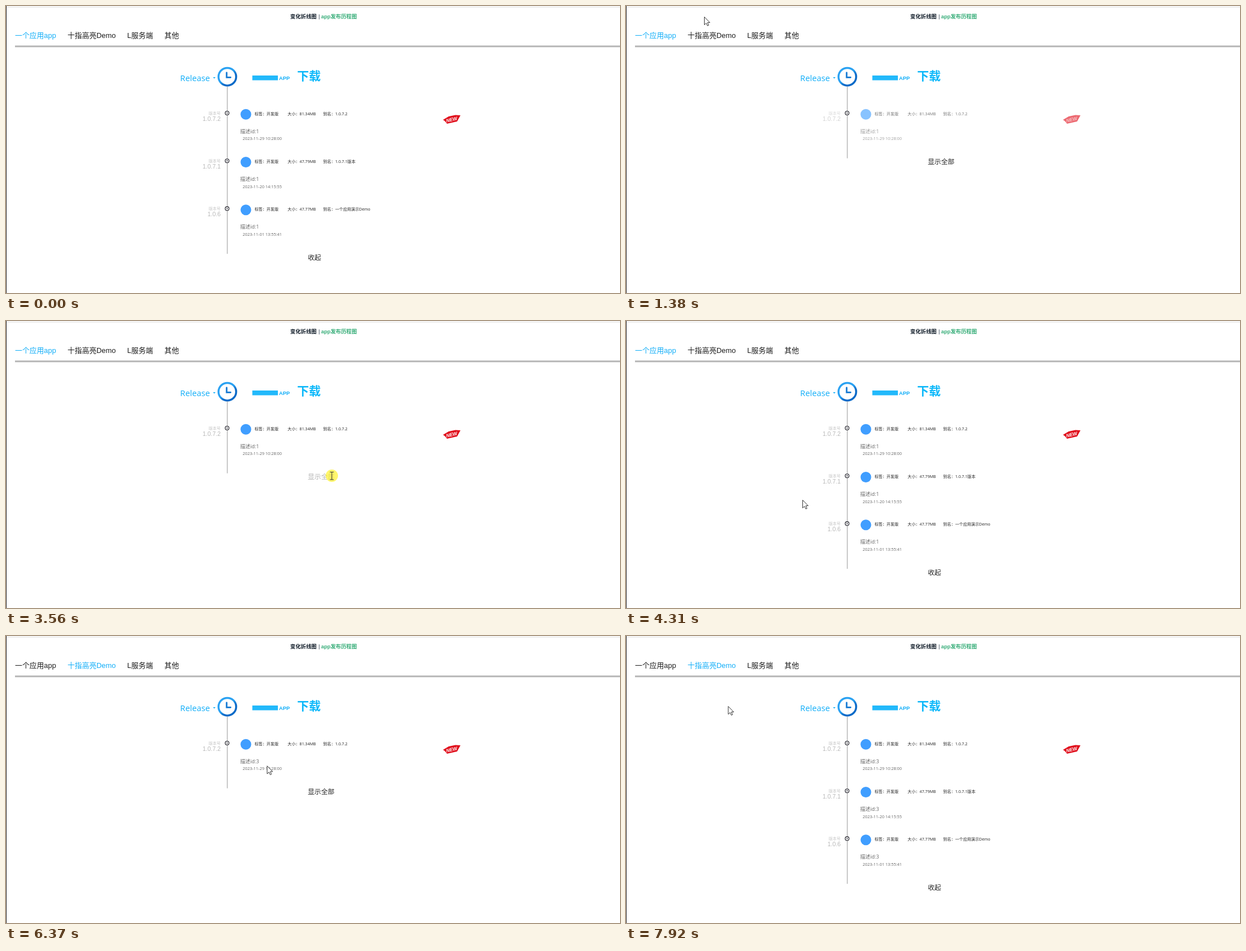
These frames come from a looping animation (1093x512 px, 7990 ms). An HTML page with a canvas:

```html
<!DOCTYPE html>
<html lang="zh-CN">
<head>
<meta charset="utf-8">
<style>
  html, body { margin: 0; width: 100%; height: 100%; overflow: hidden; background: #fff; }
  canvas { display: block; }
</style>
</head>
<body>
<canvas id="stage" width="1093" height="512"></canvas>
<script>
const ctx = document.getElementById('stage').getContext('2d');
const LOOP = 7990;
const STEP = 70;
const ROW = 85.2;
const CJK = '"Noto Sans CJK SC", "Noto Sans CJK", sans-serif';
const ARIAL = '"Liberation Sans", ' + CJK;
const UI = '"Open Sans", ' + CJK;
const BLUE = '#12aef8';

const tabs = ['一个应用app', '十指高亮Demo', 'L服务端', '其他'];
const releases = [
  { version: '1.0.7.2', size: '81.34MB', alias: '1.0.7.2', date: '2023-11-29 10:28:00' },
  { version: '1.0.7.1', size: '47.79MB', alias: '1.0.7.1版本', date: '2023-11-20 14:15:55' },
  { version: '1.0.6', size: '47.77MB', alias: '一个应用演示Demo', date: '2023-11-01 13:55:41' },
];

const RELOAD = 500, HEADER_BACK = 570, LIST_BACK = 1100, LIST_READY = 1650;
const clicks = [[3560, 3630], [5350, 5480], [7170, 7240]];

// The cursor's rests; sag bows the way there to one side
const stops = [
  { start: 1380, end: 1380, x: 139, y: 19, sag: 0 },
  { start: 1450, end: 1650, x: 140, y: 50, sag: 0 },
  { start: 1980, end: 2760, x: 433, y: 269, sag: 0.16 },
  { start: 2830, end: 3360, x: 580, y: 276, sag: -0.05 },
  { start: 3820, end: 4310, x: 314, y: 319, sag: 0.1 },
  { start: 4370, end: 5140, x: 155, y: 57, sag: -0.5 },
  { start: 5880, end: 6580, x: 565, y: 264, sag: 0.1 },
  { start: 6710, end: 6770, x: 581, y: 274, sag: 0 },
  { start: 7440, end: 7920, x: 181.5, y: 125, sag: -0.35 },
];

const arrow = new Path2D('M.5 .5V14.6L3.8 11.5 6 16.3 8.2 15.3 6.1 10.6H10.3Z');
const badge = new Path2D('M778 203L788 197 800 194.5 809 195 803 206 785 210 782 206Z');

function text(str, x, y, size, color, family = UI, weight = '', align = 'left') {
  ctx.font = `${weight} ${size}px ${family}`;
  ctx.fillStyle = color;
  ctx.textAlign = align;
  ctx.fillText(str, x, y);
  return ctx.measureText(str).width;
}

function rect(x, y, w, h, color) {
  ctx.fillStyle = color;
  ctx.fillRect(x, y, w, h);
}

function disc(x, y, r, color) {
  ctx.fillStyle = color;
  ctx.beginPath();
  ctx.arc(x, y, r, 0, 7);
  ctx.fill();
}

function ring(x, y, r, width, color) {
  ctx.strokeStyle = color;
  ctx.lineWidth = width;
  ctx.beginPath();
  ctx.arc(x, y, r, 0, 7);
  ctx.stroke();
}

function stepped(t, start, end) {
  if (t >= end) return 1;
  if (t < start) return 0;
  return (Math.floor((t - start) / STEP) + 1) / (Math.round((end - start) / STEP) + 1);
}

function drawHeader(activeTab) {
  text('变化折线图', 506, 22, 9.4, '#101c28', ARIAL, 'bold');
  text('|', 556.2, 22, 9.4, '#2c3e50', ARIAL);
  text('app发布历程图', 561, 22, 9.4, '#36ad78', ARIAL, 'bold');
  let x = 16;
  tabs.forEach((label, i) => {
    x += text(label, x, 57, 12.9, i === activeTab ? BLUE : '#1c1c1c', ARIAL) + 20.4;
  });
  rect(16, 70.5, 1077, 3, '#b5b5b5');
}

function drawTitle() {
  text('Release', 310, 134, 14.8, BLUE);
  ctx.fillStyle = BLUE;
  ctx.fill(new Path2D('M368.5 127H373L370.75 129.5Z'));

  const shade = ctx.createLinearGradient(384, 114, 405, 138);
  shade.addColorStop(0.45, '#2ba2f2');
  shade.addColorStop(0.7, '#0a6ac8');
  ring(394, 126.2, 15.7, 3.5, shade);
  ctx.strokeStyle = '#1478d2';
  ctx.lineWidth = 2.8;
  ctx.lineCap = 'round';
  ctx.stroke(new Path2D('M392.8 119V127.3H399.8'));

  rect(438.5, 124, 45.5, 8.5, '#22b9fb');
  text('APP', 486, 131.5, 9.3, BLUE, ARIAL, 'bold');
  text('下载', 518.2, 132.4, 21, '#0cb8fa', CJK, 'bold');
}

function drawBadge() {
  ctx.fillStyle = '#e00f1c';
  ctx.fill(badge);
  ctx.save();
  ctx.translate(794, 205.5);
  ctx.rotate(-0.22);
  text('NEW', 0, 0, 8.6, '#fff', ARIAL, 'italic bold', 'center');
  ctx.restore();
}

function drawRelease({ version, size, alias, date }, y, id) {
  text('版本号', 382, y + 3, 7.1, '#c6c6c6', UI, '', 'right');
  text(version, 382, y + 13.5, 10.5, '#b8b8b8', ARIAL, '', 'right');
  disc(427, y + 2.3, 9.5, '#409eff');
  text('标签：开发版', 442.5, y + 4, 7.1, '#222');
  text('大小：' + size, 501.3, y + 4, 7.1, '#222');
  text('别名：' + alias, 564.7, y + 4, 7.1, '#222');
  text('描述id:' + id, 417, y + 35.5, 9, '#666');
  text(date, 421.3, y + 48.3, 7.4, '#666');
}

function drawTimeline(expanded, id, opacity, hovered) {
  const shown = expanded ? releases : releases.slice(0, 1);
  const extra = (shown.length - 1) * ROW;
  rect(393.2, 143.5, 1.4, 128.2 + extra, '#b4b4b4');
  shown.forEach((release, i) => {
    const y = 191 + i * ROW;
    disc(393.6, y, 4, '#fff');
    ring(393.6, y, 3.4, 1.3, '#35353d');
    disc(393.6, y, 1.1, '#35353d');
    ctx.globalAlpha = opacity;
    drawRelease(release, y, id);
    if (i === 0) drawBadge();
    ctx.globalAlpha = 1;
  });
  text(expanded ? '收起' : '显示全部', 537.3, 282.3 + extra, 11.8, hovered ? '#b4b4b4' : '#222');
}

function cursorAt(t) {
  const i = Math.max(0, stops.findLastIndex(stop => t >= stop.start));
  const to = stops[i], from = stops[i - 1] || to;
  const p = stepped(t, to.start, to.end);
  const s = p * (1 + 3 * p - 2 * p * p) / 2;
  const bow = 2 * s * (1 - s) * to.sag;
  const dx = to.x - from.x, dy = to.y - from.y;
  return [from.x + dx * s - dy * bow, from.y + dy * s + dx * bow];
}

function drawHand() {
  const parts = new Path2D();
  parts.roundRect(-4.5, 7, 12, 11, 4);
  parts.roundRect(-1.5, 0.5, 3, 13, 1.5);
  ctx.stroke(parts);
  ctx.fill(parts);
}

function drawCursor(x, y, beam, pressed) {
  if (pressed) disc(x, y, 11, 'rgba(255, 242, 40, 0.68)');
  ctx.save();
  ctx.translate(x, y);
  ctx.lineCap = 'butt';
  ctx.lineWidth = 1;
  ctx.strokeStyle = '#333';
  ctx.fillStyle = '#fff';
  if (beam) {
    ctx.stroke(new Path2D('M-3.5-6.5H3.5M0-6.5V7M-3.5 7H3.5'));
  } else if (x > 108 && x < 198 && y > 42 && y < 63) {
    ctx.lineWidth = 2;
    drawHand();
  } else {
    ctx.fill(arrow);
    ctx.stroke(arrow);
  }
  ctx.restore();
}

function draw(t) {
  rect(0, 0, 1093, 512, '#fff');
  rect(0, 1.5, 1093, 1, '#dedede');
  rect(0, 0, 1, 512, '#26262a');

  // Clicks in turn: open the list, change the tab (closes it), open it again
  const done = clicks.filter(([, up]) => t >= up).length;
  const pressed = clicks.some(([down, up]) => t >= down && t < up);
  const before = t < RELOAD;
  const expanded = before || done % 2 === 1;
  const switched = done >= 2;
  const [x, y] = cursorAt(t);
  const hovered = !expanded && x > 570;

  if (before || t >= HEADER_BACK) {
    drawHeader(switched ? 1 : 0);
    drawTitle();
  }
  if (before || t >= LIST_BACK) {
    const opacity = before ? 1 : stepped(t, LIST_BACK, LIST_READY) ** 0.8;
    drawTimeline(expanded, switched ? 3 : 1, opacity, hovered);
  }
  if (t >= stops[0].start) drawCursor(x, y, hovered, pressed);
}

function frame(now) {
  draw(now % LOOP);
  requestAnimationFrame(frame);
}
requestAnimationFrame(frame);
</script>
</body>
</html>
```
